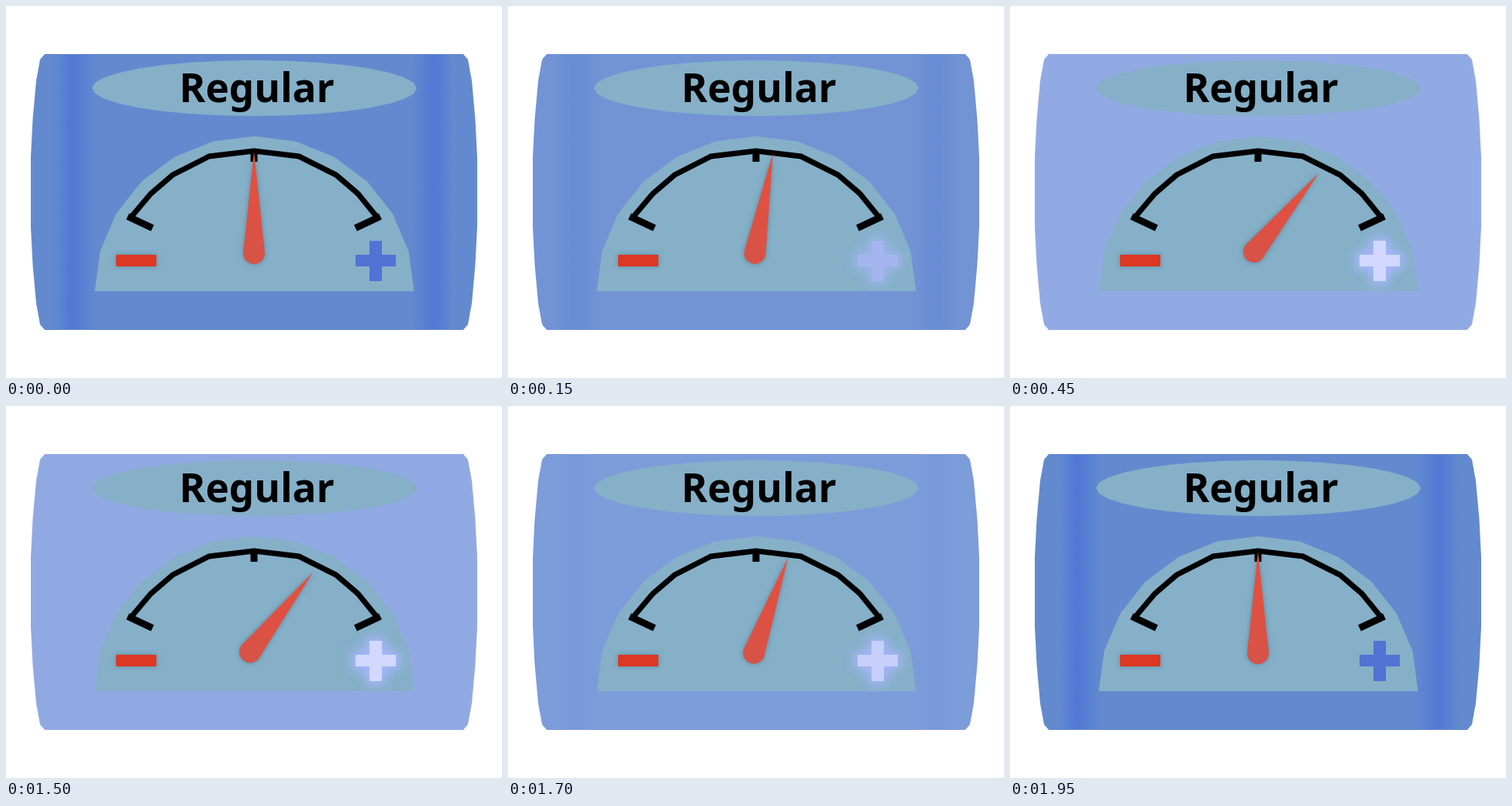
Animation of 640 by 480 pixels, one loop 2 s. Source, as an HTML page:

```html
<!DOCTYPE html>
<html lang="en">
<head>
<meta charset="utf-8">
<style>
  html, body { margin: 0; width: 100%; height: 100%; overflow: hidden; background: #fff; }
  svg { display: block; }
  .shade { filter: drop-shadow(0 0 3px rgba(50, 95, 115, .5)); }
  text { font: bold 51.3px "Noto Sans", "Open Sans", sans-serif; }
</style>
</head>
<body>
<svg width="640" height="480" viewBox="0 0 640 480">
  <defs>
    <linearGradient id="band">
      <stop offset="0" stop-color="#5078d6" stop-opacity="0"/>
      <stop offset=".42" stop-color="#5078d6"/>
      <stop offset="1" stop-color="#5078d6" stop-opacity="0"/>
    </linearGradient>
    <linearGradient id="red" x2="0" y2="1">
      <stop offset="0" stop-color="#e84e3c"/>
      <stop offset="1" stop-color="#d65347"/>
    </linearGradient>
    <filter id="blur" x="-1" y="-1" width="3" height="3"><feGaussianBlur stdDeviation="7"/></filter>
    <path id="cross" d="M469 303h16v18h18v15h-18v19h-16v-19h-18v-15h18z"/>
  </defs>
  <polygon id="body"/>
  <g id="bands" fill="url(#band)">
    <path d="M62 63H118V417H62z"/>
    <path d="M62 63H118V417H62z" transform="matrix(-1 0 0 1 640 0)"/>
  </g>
  <g fill="#85b0c8">
    <polygon id="plate"/>
    <polygon id="dial"/>
  </g>
  <text x="223.6" y="124">Regular</text>
  <g fill="none" stroke="#000">
    <path stroke-width="7" d="M160 274 187 242 215 218 262 194 320 187 378 194 426 218 454 242 480 274"/>
    <path stroke-width="9" d="M157 271.500 189 286.500M483 271.500 451 286.500M320 186V201"/>
  </g>
  <path class="shade" fill="#dc3823" d="M142 321h52v15h-52z"/>
  <use id="glow" href="#cross" fill="#a9b6ff" stroke="#a9b6ff" stroke-width="9" filter="url(#blur)"/>
  <use id="plus" href="#cross"/>
  <g class="shade">
    <path id="needle" fill="url(#red)" d="M320 188 334 319A14 14 0 0 1 306 319z"/>
  </g>
</svg>
<script>
const el = id => document.getElementById(id);
const mirror = (points, fn) => points.concat([...points].reverse().map(fn));

const corner = [[50, 62], [44, 69], [39, 96], [34.5, 146], [32, 195]];
const side = mirror(corner, ([x, y]) => [x, 480 - y]);
el('body').setAttribute('points', mirror(side, ([x, y]) => [640 - x, y]).join(' '));

function arc(cx, cy, rx, ry, sides, count) {
  return Array.from({ length: count }, (_, i) => {
    const a = Math.PI + i * 2 * Math.PI / sides;
    return [cx + rx * Math.cos(a), cy + ry * Math.sin(a)];
  }).join(' ');
}
el('plate').setAttribute('points', arc(320.5, 106, 209.5, 36, 32, 32));
el('dial').setAttribute('points', arc(320.5, 368, 206, 200, 24, 13));

const ease = u => u * u * (3 - 2 * u);
const clamp = u => Math.min(1, Math.max(0, u));
const mix = (a, b, k) => `rgb(${a.map((v, i) => v + (b[i] - v) * k)})`;

function draw(now) {
  const t = Math.floor(now % 2000 / 50) * 50;
  const p = ease(clamp(t / 450)) * (1 - ease(clamp((t - 1450) / 500)));
  const light = 1 - (1 - p) ** 3.5;
  el('body').setAttribute('fill', mix([99, 138, 206], [146, 170, 228], p ** .85));
  el('bands').setAttribute('opacity', (1 - p) ** 4);
  el('plus').setAttribute('fill', mix([80, 115, 212], [210, 216, 255], light));
  el('glow').setAttribute('opacity', light);
  el('needle').setAttribute('transform', `rotate(${39.35 * p} 320 311)`);
  requestAnimationFrame(() => draw(performance.now()));
}
draw(performance.now());
</script>
</body>
</html>
```
